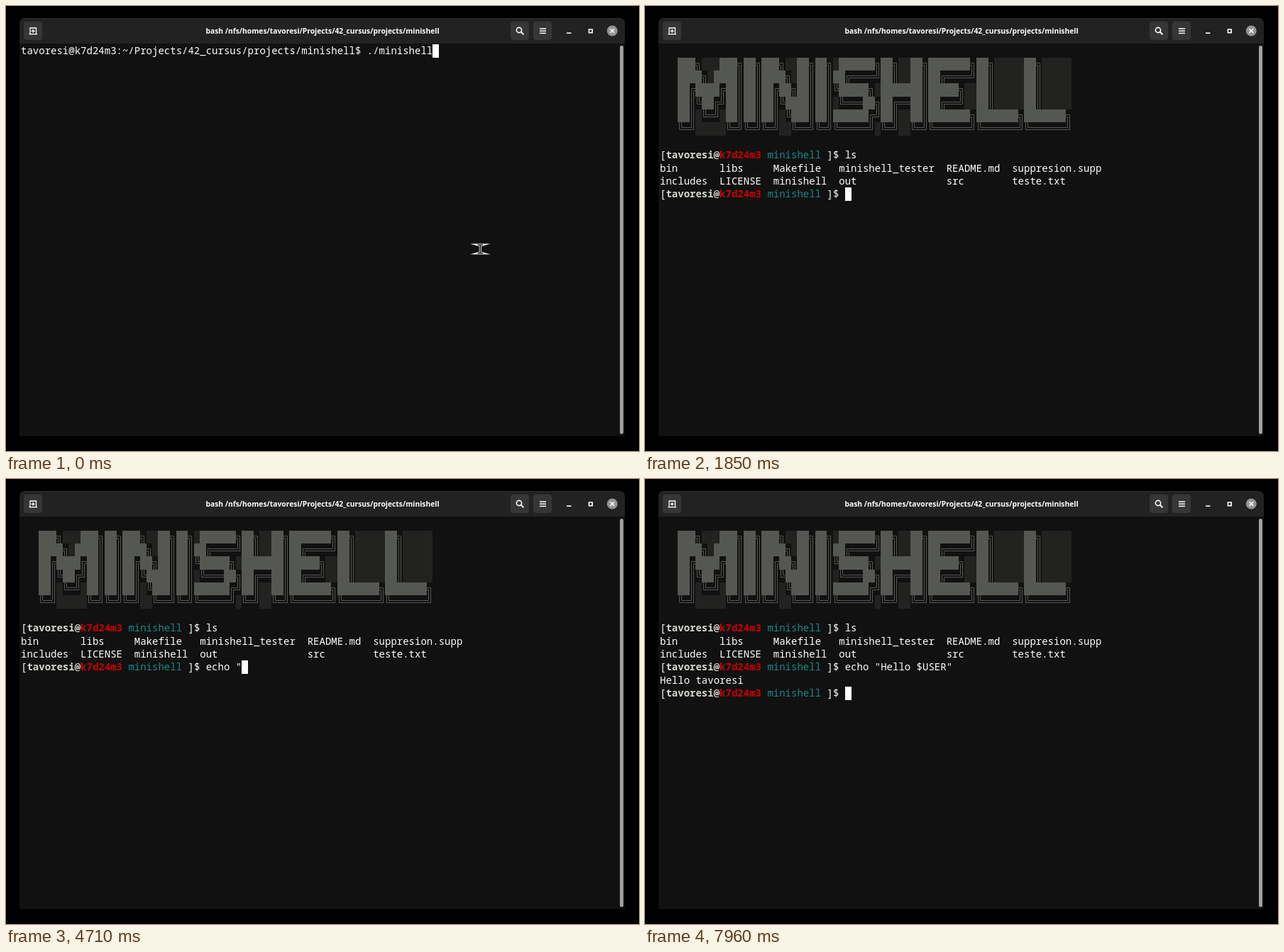
These frames come from a looping animation (892 px wide and 628 px high, 8000 ms). An HTML page with a canvas:

```html
<!DOCTYPE html>
<html lang="en">
<head>
<meta charset="utf-8">
<title>minishell</title>
<style>
html, body { margin: 0; height: 100%; overflow: hidden; background: #000; }
canvas { display: block; }
</style>
</head>
<body>
<canvas id="stage" width="892" height="628"></canvas>
<script>
const ctx = document.getElementById('stage').getContext('2d');
const LOOP = 8000, LEFT = 21, TOP = 54.3, CW = 8.41, LH = 18.36;
const USER = 'tavoresi', HOST = 'k7d24m3', DIR = 'Projects/42_cursus/projects/minishell';
const MONO = '14.02px "Noto Sans Mono", monospace';
const GREY = '#555753', WHITE = '#fff';

const BANNER = [
  '███╗░░░███╗██╗███╗░░██╗██╗░██████╗██╗░░██╗███████╗██╗░░░░░██╗░░░░░',
  '████╗░████║██║████╗░██║██║██╔════╝██║░░██║██╔════╝██║░░░░░██║░░░░░',
  '██╔████╔██║██║██╔██╗██║██║╚█████╗░███████║█████╗░░██║░░░░░██║░░░░░',
  '██║╚██╔╝██║██║██║╚████║██║░╚═══██╗██╔══██║██╔══╝░░██║░░░░░██║░░░░░',
  '██║░╚═╝░██║██║██║░╚███║██║██████╔╝██║░░██║███████╗███████╗███████╗',
  '╚═╝░░░░░╚═╝╚═╝╚═╝░░╚══╝╚═╝╚═════╝░╚═╝░░╚═╝╚══════╝╚══════╝╚══════╝'
];
const CORNERS = { '╗': [-1, 1], '╔': [1, 1], '╝': [-1, -1], '╚': [1, -1] };

const FILES = [
  'bin       libs     Makefile   minishell_tester  README.md  suppresion.supp',
  'includes  LICENSE  minishell  out               src        teste.txt'
];

// Key press times for each typed command
const LS = { text: 'ls', times: [1430, 1600] };
const ECHO = {
  text: 'echo "Hello $USER"',
  times: [3310, 3560, 3635, 3710, 3890, 4710, 5290, 5600, 5690, 5840,
          6100, 6160, 6750, 6980, 7170, 7220, 7480, 7740]
};
const CURSOR_OFF = [[530, 920], [2410, 2970], [4440, 4550]];
const typed = (cmd, t) => cmd.text.slice(0, cmd.times.filter(k => k <= t).length);

function box(x, y, w, h, color, r = 0) {
  ctx.fillStyle = color;
  ctx.beginPath();
  ctx.roundRect(x, y, w, h, r);
  ctx.fill();
}

function line(points, color = WHITE, width = 1.5, close = false) {
  ctx.strokeStyle = color;
  ctx.lineWidth = width;
  ctx.beginPath();
  points.forEach(([x, y]) => ctx.lineTo(x, y));
  if (close) ctx.closePath();
  ctx.stroke();
}

function write(text, col, row, color = WHITE, weight = '') {
  ctx.font = weight + ' ' + MONO;
  ctx.textAlign = 'left';
  ctx.fillStyle = color;
  ctx.fillText(text, LEFT + col * CW, TOP + 14 + row * LH);
}

function cursor(col, row, t) {
  if (CURSOR_OFF.some(([from, to]) => t >= from && t < to)) return;
  box(Math.round(LEFT + col * CW), Math.round(TOP + row * LH), 9, 19, WHITE);
}

function prompt(row, input) {
  write('[', 0, row);
  write(USER + '@', 1, row, '#d3d7cf', 'bold');
  write(HOST, 10, row, '#c00', 'bold');
  write('minishell', 18, row, '#158a88');
  write(']$ ' + input, 28, row);
}

function bannerCell(ch, col, row) {
  const x0 = Math.round(LEFT + col * CW), x1 = Math.round(LEFT + (col + 1) * CW);
  const y0 = Math.round(TOP + row * LH), y1 = Math.round(TOP + (row + 1) * LH);
  if (ch === '█' || ch === '░') {
    box(x0, y0, x1 - x0, y1 - y0, ch === '█' ? GREY : '#222221');
    return;
  }
  const cx = x0 + 4, cy = y0 + 9, d = 1.5;
  for (const k of [-d, d]) {
    if (ch === '═') line([[x0, cy + k], [x1, cy + k]], GREY, 1);
    else if (ch === '║') line([[cx + k, y0], [cx + k, y1]], GREY, 1);
    else {
      const [sx, sy] = CORNERS[ch];
      const px = cx + k * sx, py = cy + k * sy;
      line([[sx < 0 ? x0 : x1, py], [px, py], [px, sy < 0 ? y0 : y1]], GREY, 1);
    }
  }
}

function drawWindow() {
  box(0, 0, 892, 628, '#000');
  box(19, 17, 853, 590, '#111', [7, 7, 0, 0]);
  box(19, 17, 853, 36, '#222', [7, 7, 0, 0]);
  box(25, 17, 841, 1, '#2c2c2c');
  ctx.font = 'bold 10.3px "Noto Sans", sans-serif';
  ctx.textAlign = 'center';
  ctx.fillStyle = WHITE;
  ctx.fillText('bash /nfs/homes/' + USER + '/' + DIR, 446, 39);

  for (const x of [25, 711, 743]) box(x, 22, 26, 26, '#363636', 4);
  // new tab
  line([[34, 39.5], [34, 31], [42.5, 31], [42.5, 39.5]], WHITE, 1.3);
  line([[32.5, 39.7], [44, 39.7]], WHITE, 1.3);
  line([[38.2, 32.8], [38.2, 38]], WHITE, 1.3);
  line([[35.6, 35.4], [40.8, 35.4]], WHITE, 1.3);
  // search
  ctx.strokeStyle = WHITE;
  ctx.lineWidth = 1.6;
  ctx.beginPath();
  ctx.arc(723, 34, 3.6, 0, 7);
  ctx.stroke();
  line([[725.6, 36.6], [729.4, 40.2]], WHITE, 2);
  // menu, minimise, maximise, close
  for (const y of [32, 35.2, 38.4]) line([[752, y], [761, y]], WHITE, 1.5);
  line([[790, 38.2], [796.5, 38.2]], WHITE, 1.6);
  line([[821.5, 33], [826.2, 33], [826.2, 37.6], [821.5, 37.6]], WHITE, 1.6, true);
  box(846.8, 27.5, 15, 15, '#949494', 7.5);
  line([[851.5, 32.2], [857.2, 37.9]]);
  line([[857.2, 32.2], [851.5, 37.9]]);

  box(865, 56, 5, 548, '#a0a09f', 2.5);
}

function beam(x, y) {
  const shape = [[x - 3.5, y - 6], [x + 3.5, y - 6], [x, y - 5], [x, y + 5], [x - 3.5, y + 6], [x + 3.5, y + 6], [x, y + 5], [x, y - 5]];
  line(shape, WHITE, 3, true);
  line(shape, '#000', 1, true);
}

function arrow(x, y) {
  const shape = [[0, 0], [0, 11], [3, 8.5], [5, 12.5], [6.5, 12], [4.8, 8], [8, 8]].map(([a, b]) => [x + a, y + b]);
  line(shape, WHITE, 1.5, true);
  ctx.fillStyle = '#000';
  ctx.fill();
}

function drawPointer(t) {
  if (t < 180) beam(668.3, 343);
  else if (t < 225) beam(694, 194);
  else if (t < 270) arrow(720, 38);
}

function draw(t) {
  drawWindow();
  if (t < 920) {
    const command = `${USER}@${HOST}:~/${DIR}$ ./minishell`;
    write(command, 0, 0);
    cursor(command.length, 0, t);
    drawPointer(t);
    return;
  }
  BANNER.forEach((text, r) => [...text].forEach((ch, c) => bannerCell(ch, c + 3, r + 1)));
  let input = typed(LS, t), row = 8;
  prompt(row, input);
  if (t >= 1850) {
    FILES.forEach((text, i) => write(text, 0, 9 + i));
    input = typed(ECHO, t);
    row = 11;
    prompt(row, input);
  }
  if (t >= 7960) {
    write('Hello ' + USER, 0, 12);
    input = '';
    row = 13;
    prompt(row, input);
  }
  cursor(31 + input.length, row, t);
}

const start = performance.now();
function frame() {
  draw((performance.now() - start) % LOOP);
  requestAnimationFrame(frame);
}
frame();
</script>
</body>
</html>
```
